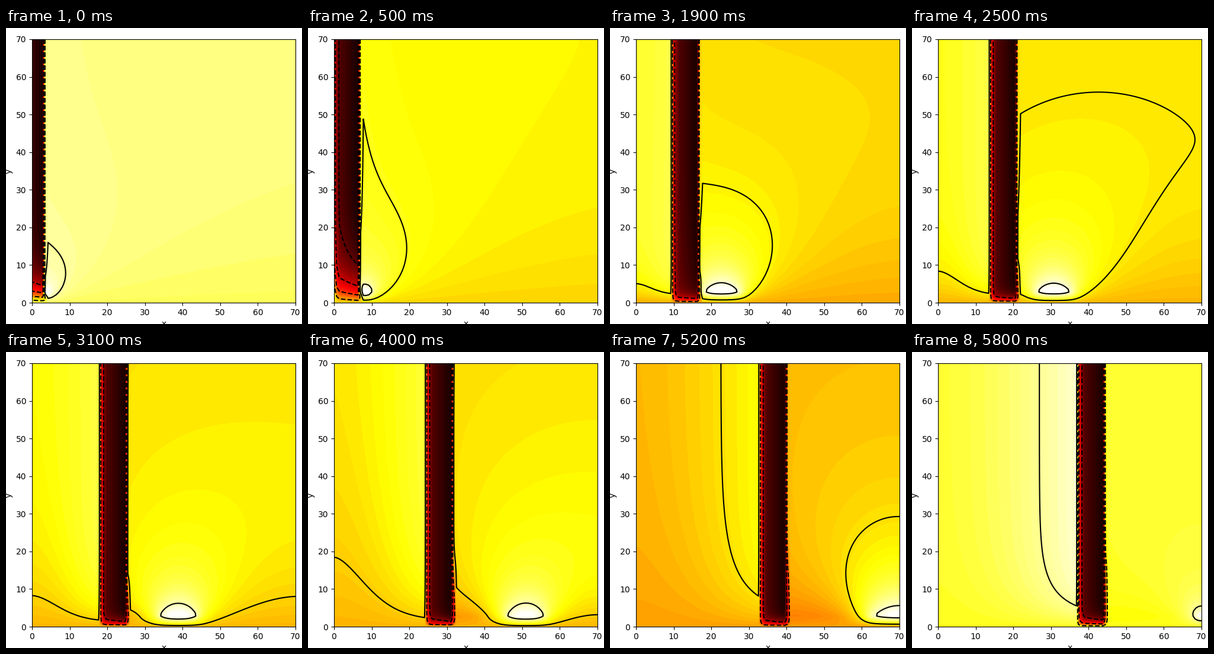
These frames come from a looping animation (500 px wide and 500 px high, 5900 ms). A matplotlib script:

```python
import numpy as np
import matplotlib.pyplot as plt
from matplotlib.animation import FuncAnimation

N, FRAMES, SIZE = 100, 59, 70.0
axis = np.linspace(0, SIZE, N)
X, Y = np.meshgrid(axis, axis)
SRC_H = axis[4]
FILL = np.linspace(0, 1, 76)


def grow(y, scale):
    """Rise from zero at the ground towards one."""
    return 1 - np.exp(-y / scale)


def strip(a, b):
    """Potential of a source strip above the ground, mirrored at the right wall."""
    total = np.zeros_like(X)
    pts = a + (b - a) * (np.arange(24) + .5) / 24
    for s in np.concatenate([pts, 2 * SIZE - pts]):
        d2 = (X - s) ** 2
        total += np.log((d2 + (Y + SRC_H) ** 2 + .15) / (d2 + (Y - SRC_H) ** 2 + .15))
    return total * (b - a) / 24


def ahead(n, edge, late):
    """Field in front of the band: moving blob, background and trailing dip."""
    dx = np.maximum(X - edge, 0)
    front = 3 + 1.333 * n
    a = min(max(edge + .5, front - 11), SIZE - 1.5)
    b = min(max(front, a + 1), SIZE)
    width = b - a
    blob = strip(a, b)
    v = blob + (1 + 1.2 * np.sin(np.pi * n / 58)) * grow(Y, 3 + .25 * dx)
    v += .33 * width * (1 - late) * np.exp(-dx / 10) * grow(Y, 3)
    gap = max(front - 16 - edge, 0)
    fade = np.sqrt(width / 11)
    v -= .16 * fade * strip(edge, edge + gap)
    v -= 2.5 * fade * min(gap / 8, 1) * np.exp(-dx / 6 - Y / 25) * grow(Y, 1)
    return v, blob[X > edge].max()


def behind(n, edge, late):
    """Wake left of the band, strongest next to it."""
    u = np.clip(X / max(edge, 1), 0, 1)
    near, far = 13.5 - .07 * n, 14.3 - .225 * n
    gain = far + (near - far) * u ** 1.5 + 3.7 * (1 - late) * np.exp(-Y / 60)
    slow = 3 + 26 * np.exp(-((n - 43) / 15) ** 2)
    fast = 2 + .2 * slow
    return gain * grow(Y, fast + (slow - fast) * np.exp(-(u / .56) ** 2))


def band(n, k, late):
    """Dark column, as a share of the full range."""
    low = .02 + .11 * np.clip(1 - k / 9, 0, 1)
    low = low + .25 * (k == 0) + .06 * (k == 1)
    heat = .65 * np.exp(-n / 25) * (1 - late)
    return low + heat * np.exp(-Y / (4.5 + .3 * n))


def field(n):
    first, last = n - 5, n + 4
    k = np.arange(N)[None, :] - first
    late = .5 * (1 + np.tanh((n - 16) / 4))
    depth = 24 + 16 * late

    right, peak = ahead(n, axis[last], late)
    unit = 1 / (depth + peak)
    ground = depth * unit
    left = behind(n, axis[max(first, 0)], late)
    v = ground + unit * np.where(k < 0, left, right)

    core = ground + (band(n, k, late) - ground) * grow(Y, 1.1)
    v = np.where((k >= 0) & (k <= 9), core, v)
    spill = .03 + .25 * np.exp(-(axis / (2 + .3 * n)) ** 4)
    v[:, last + 1] -= spill * grow(axis, 1.1)

    level = ground + unit * (4.4 - 2.4 * np.cos(2 * np.pi * n / 36))
    return np.clip(v, .001, .999), level, .16 + .08 * late


fig = plt.figure(figsize=(5, 5), dpi=100)
ax = fig.add_axes([44 / 500, 36 / 500, 445 / 500, 445 / 500])
ax.set(xlim=(0, SIZE), ylim=(0, SIZE), xlabel="x", ylabel="y",
       xticks=range(0, 71, 10), yticks=range(0, 71, 10))
drawn = []


def update(n):
    while drawn:
        drawn.pop().remove()
    v, level, step = field(n)
    lines = [(level + i * step, "dashed" if i < 0 else "solid") for i in range(-4, 2)]
    lines = [(z, s) for z, s in lines if .095 < z < .97]
    levels, styles = zip(*lines)
    drawn.append(ax.contourf(X, Y, v, FILL, cmap="hot", vmin=0, vmax=1))
    drawn.append(ax.contour(X, Y, v, levels, colors="k",
                            linestyles=list(styles), linewidths=1.5))
    return drawn


anim = FuncAnimation(fig, update, frames=FRAMES, interval=100,
                     init_func=lambda: [], repeat=True, repeat_delay=0)
plt.show()
```
